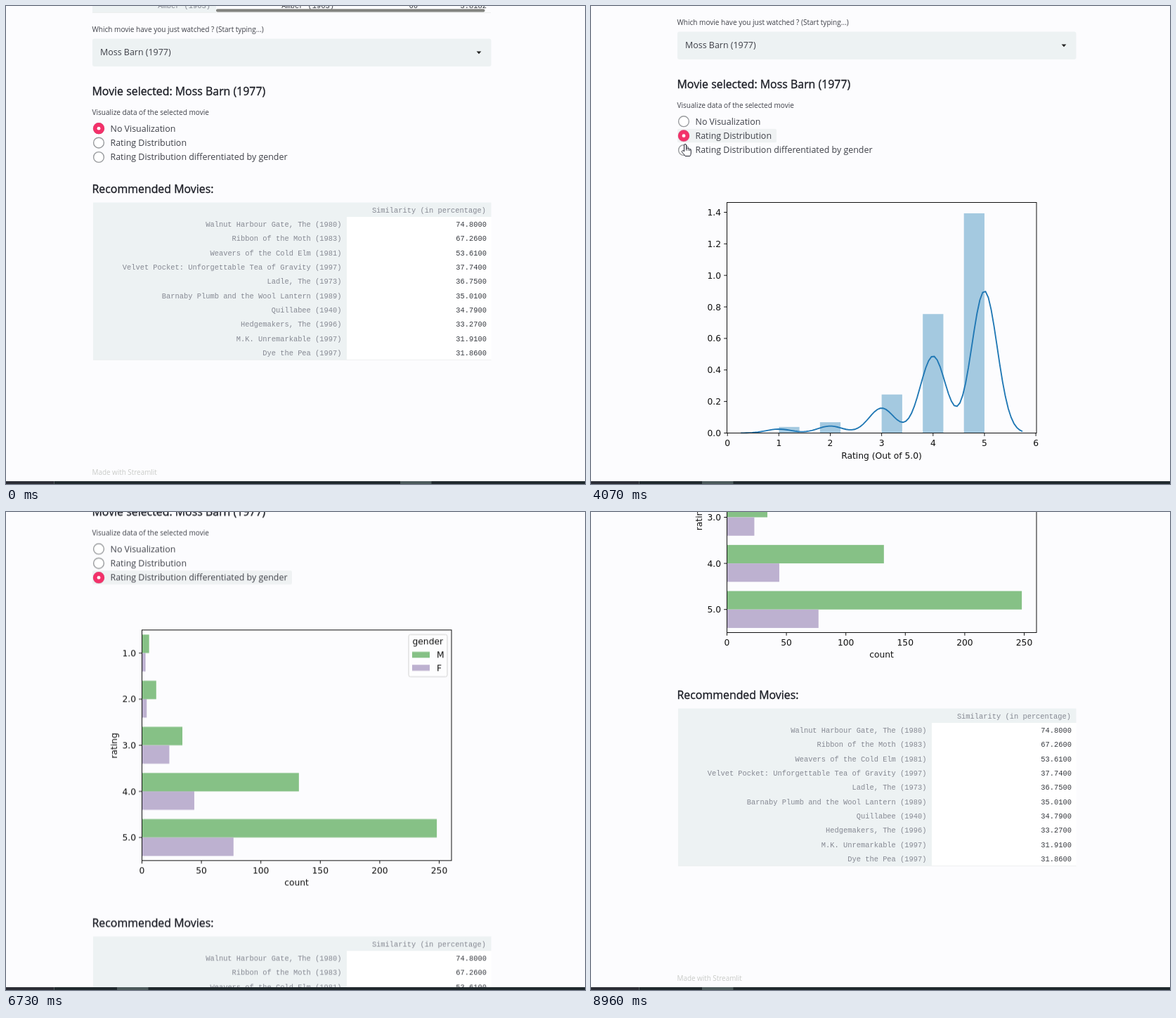
These frames come from a looping animation (824x680 px, 9.01 s). An HTML page:

```html
<!DOCTYPE html>
<html lang="en">
<head>
<meta charset="utf-8">
<title>Movie recommender</title>
<style>
html, body { margin: 0; width: 100%; height: 100%; overflow: hidden; background: #fcfcfe; }
#stage { position: relative; width: 824px; height: 680px; overflow: hidden; }
svg { position: absolute; left: 0; top: 0; overflow: visible; }

text { font-family: "Open Sans", "Noto Sans", sans-serif; font-size: 12.45px; fill: #3f4149; white-space: pre; }
.small { font-size: 10.05px; }
.head { font-size: 15.9px; fill: #1c1e26; stroke: #1c1e26; stroke-width: .35px; }
.foot { font-size: 9.9px; fill: #c9cbc8; }
.mono { font-family: "Liberation Mono", monospace; font-size: 10.4px; text-anchor: end; fill: #373a40; }
.dim { fill: #868993; }
.plot text { font-family: "DejaVu Sans", sans-serif; font-size: 12.3px; fill: #111; }
.end { text-anchor: end; }
.mid { text-anchor: middle; }
.axis { fill: none; stroke: #111; stroke-width: 1; }
.panel { fill: #edf2f3; }

#page, #lower, #plot1, #plot2, #row2, #row3, #dot, #cursor, #arrow, #hand, #task { animation: 9010ms linear infinite; }

#page { animation-name: scroll; }
@keyframes scroll {
  0%, 24.97% { transform: translateY(0); }
  28.08% { transform: translateY(-5px); }
  29.52% { transform: translateY(-5px); animation-timing-function: ease-out; }
  33.74%, 70.92% { transform: translateY(-10px); }
  71.37% { transform: translateY(-11px); animation-timing-function: cubic-bezier(.3, .15, .7, .63); }
  74.69% { transform: translateY(-121px); }
  79.47% { transform: translateY(-315.5px); animation-timing-function: cubic-bezier(.25, .44, .5, 1); }
  85%, 100% { transform: translateY(-446px); }
}
#lower { animation-name: lower; }
@keyframes lower {
  0%, 20% { transform: translateY(0); opacity: 1; }
  24.96% { transform: translateY(0); opacity: .4; animation-timing-function: step-end; }
  24.97%, 100% { transform: translateY(446px); opacity: 1; }
}
#plot1 { animation-name: plot1; }
@keyframes plot1 {
  0% { opacity: 0; animation-timing-function: step-end; }
  24.97%, 54.5% { opacity: 1; }
  60.4% { opacity: .4; animation-timing-function: step-end; }
  60.41%, 100% { opacity: 0; }
}
#plot2 { animation-name: plot2; animation-timing-function: step-end; }
@keyframes plot2 { 0% { opacity: 0; } 60.41%, 100% { opacity: 1; } }

#row2 { animation-name: row2; animation-timing-function: step-end; }
@keyframes row2 { 0% { opacity: 0; } 18.53% { opacity: 1; } 52.83%, 100% { opacity: 0; } }
#row3 { animation-name: row3; animation-timing-function: step-end; }
@keyframes row3 { 0% { opacity: 0; } 52.83%, 100% { opacity: 1; } }
#dot { animation-name: dot; animation-timing-function: step-end; }
@keyframes dot {
  0% { transform: translateY(0); }
  18.53% { transform: translateY(20.4px); }
  52.83%, 100% { transform: translateY(40.8px); }
}
#task { animation-name: task; animation-timing-function: step-end; }
@keyframes task { 0% { transform: translateX(403px); } 5.5%, 100% { transform: translateX(0); } }

#cursor { animation-name: cursor; }
@keyframes cursor {
  0%, 1.44% { transform: translate(590px, 690px); animation-timing-function: ease-out; }
  7.66%, 9.54% { transform: translate(236px, 199px); animation-timing-function: ease-in-out; }
  14.32%, 44.7% { transform: translate(133px, 195px); }
  45.17% { transform: translate(134px, 197px); }
  48.06%, 59.9% { transform: translate(135px, 206px); animation-timing-function: ease-in; }
  62.82% { transform: translate(178px, 231px); }
  67.04%, 100% { transform: translate(830px, 332px); }
}
#arrow { animation-name: arrow; animation-timing-function: step-end; }
@keyframes arrow { 0% { opacity: 1; } 6.5% { opacity: 0; } 61.5% { opacity: 1; } 67.04%, 100% { opacity: 0; } }
#hand { animation-name: hand; animation-timing-function: step-end; }
@keyframes hand { 0% { opacity: 0; } 6.5% { opacity: 1; } 61.5%, 100% { opacity: 0; } }
</style>
</head>
<body>
<div id="stage">
  <svg id="page" width="824" height="1200"></svg>
  <svg width="824" height="680">
    <rect y="676" width="824" height="4" fill="#20292d"/>
    <rect y="676" width="68" height="4" fill="#2b2d35"/>
    <rect x="68" y="676" width="1" height="4" fill="#50565a"/>
    <rect id="task" x="158" y="676" width="44.5" height="4" fill="#4c5a5b"/>
    <g id="cursor" stroke="#1b1d2a" stroke-linejoin="round" fill="#fff">
      <path id="arrow" d="M0 0V15.5L3.6 12.2 6 17.6 8.4 16.5 6 11.3H11Z"/>
      <g id="hand">
        <path d="M-1.5 10V1a1.5 1.5 0 0 1 3 0v5l.3-.5a1.4 1.4 0 0 1 2.4.6 1.4 1.4 0 0 1 2.3.6 1.3 1.3 0 0 1 1.8 1.2v4.1q0 2.5-1.5 4.5H0q-2-3-4.6-5.8a1.5 1.5 0 0 1 2-2z"/>
        <path d="M1.5 6V8.5M4.2 6.5V8.7M6.5 7.2V9" fill="none"/>
      </g>
    </g>
  </svg>
</div>
<script>
const title = "Moss Barn (1977)";
const movies = [
  ["Walnut Harbour Gate, The (1980)", "74.8000"],
  ["Ribbon of the Moth (1983)", "67.2600"],
  ["Weavers of the Cold Elm (1981)", "53.6100"],
  ["Velvet Pocket: Unforgettable Tea of Gravity (1997)", "37.7400"],
  ["Ladle, The (1973)", "36.7500"],
  ["Barnaby Plumb and the Wool Lantern (1989)", "35.0100"],
  ["Quillabee (1940)", "34.7900"],
  ["Hedgemakers, The (1996)", "33.2700"],
  ["M.K. Unremarkable (1997)", "31.9100"],
  ["Dye the Pea (1997)", "31.8600"]
];
const men = [6, 12, 34, 132, 248];
const women = [3, 4, 23, 44, 77];
const green = "#86c186", violet = "#bdb1d0";

const text = (x, y, s, cls = "") => `<text x="${x}" y="${y}" class="${cls}">${s}</text>`;
const rect = (x, y, w, h, attrs) => `<rect x="${x}" y="${y}" width="${w}" height="${h}" ${attrs}/>`;
const range = n => [...Array(n).keys()];

// Axes box shared by both plots
const L = 193.5, R = 634, T = 289.5, B = 617.5;
const frame = rect(L, T, R - L, B - T, 'class="axis"');
const xTick = (x, s) => `<path class="axis" d="M${x} ${B}v4.3"/>` + text(x, 636, s, "mid");
const yTick = (y, s) => `<path class="axis" d="M${L} ${y}h-4.3"/>` + text(185, y + 4.5, s, "end");

function distribution() {
  const px = v => 194.2 + 73.15 * v, py = v => B - 224.3 * v;
  const counts = men.map((m, i) => m + women[i]);
  const total = counts.reduce((a, b) => a + b);
  const starts = [1, 1.8, 3, 3.8, 4.6], h = 0.247;
  const density = x => counts.reduce((sum, c, i) =>
    sum + c * Math.exp(-(((x - i - 1) / h) ** 2) / 2), 0) / (total * h * Math.sqrt(2 * Math.PI));
  const bars = counts.map((c, i) => {
    const y = py(c / total / 0.4);
    return rect(px(starts[i]), y, 29.26, B - y, 'fill="#a4c9e0"');
  });
  const curve = range(100).map(i => {
    const x = 0.26 + 5.48 * i / 99;
    return px(x).toFixed(2) + "," + py(density(x)).toFixed(2);
  });
  return bars.join("") +
    `<polyline points="${curve.join(" ")}" fill="none" stroke="#1f77b4" stroke-width="1.85"/>` + frame +
    range(7).map(i => xTick(px(i), i)).join("") +
    range(8).map(i => yTick(py(i / 5), (i / 5).toFixed(1))).join("") +
    text(413.5, 653.5, "Rating (Out of 5.0)", "mid");
}

function byGender() {
  const step = (B - T) / 5, bar = step * 0.4, unit = 1.692;
  const rows = range(5).map(i => {
    const y = T + step * (i + 0.5);
    return rect(L, y - bar, men[i] * unit, bar, `fill="${green}"`) +
      rect(L, y, women[i] * unit, bar, `fill="${violet}"`) + yTick(y, (i + 1).toFixed(1));
  });
  const key = (y, color, s) => rect(578, y, 25, 8.5, `fill="${color}"`) + text(613, y + 8.7, s);
  return rows.join("") + frame +
    range(6).map(i => xTick(L + i * 50 * unit, i * 50)).join("") +
    text(413.5, 653, "count", "mid") +
    `<g transform="translate(158 454) rotate(-90)">${text(0, 0, "rating", "mid")}</g>` +
    rect(573, 296, 55, 60, 'rx="2.5" fill="#fdfdfe" stroke="#d2d2d2"') +
    text(600.3, 310, "gender", "mid") + key(320.5, green, "M") + key(339, violet, "F");
}

function tableTail() {
  return rect(123, -20, 176, 29.5, 'class="panel"') +
    text(291, 2.5, "Amber (1963)", "mono dim") + text(467, 2.5, "Amber (1963)", "mono") +
    text(586, 2.5, "66", "mono") + text(684, 2.5, "3.8182", "mono") +
    rect(123, 9, 567, 1, 'fill="#eceeee"') + rect(299, 4.3, 382.5, 4.2, 'rx="2" fill="#82837f"');
}

function controls() {
  const options = ["No Visualization", "Rating Distribution", "Rating Distribution differentiated by gender"];
  return text(122.5, 36.8, "Which movie have you just watched ? (Start typing...)", "small") +
    rect(123, 46.5, 567.5, 39.5, 'rx="3" class="panel"') + text(134, 70.3, title) +
    '<path d="M669.6 64.6h6.8l-3.4 3.6z" fill="#222"/>' +
    text(122.5, 127, "Movie selected: " + title, "head") +
    text(122.5, 154.8, "Visualize data of the selected movie", "small") +
    rect(123, 184.7, 141, 19.6, 'id="row2" rx="2" fill="#eff2f3"') +
    rect(123, 205.1, 284, 19.6, 'id="row3" rx="2" fill="#eff2f3"') +
    options.map((s, i) => {
      const y = 174.2 + 20.4 * i;
      return `<circle cx="132" cy="${y}" r="7.4" fill="#fff" stroke="#999b9e" stroke-width="1.4"/>` + text(148.5, y + 4.4, s);
    }).join("") +
    '<g id="dot"><circle cx="132" cy="174.2" r="8.1" fill="#f3316a"/><circle cx="132" cy="174.2" r="2.4" fill="#fff"/></g>';
}

function recommended() {
  const pitch = 20.33;
  return text(122.5, 266, "Recommended Movies:", "head") +
    rect(124, 279.5, 361, 224, 'class="panel"') + rect(485, 279.5, 205.5, 20.5, 'class="panel"') +
    rect(485, 300, 205.5, 203, 'fill="#fff"') + rect(124, 503, 566.5, 1, 'fill="#eef0f1"') +
    text(683, 293.6, "Similarity (in percentage)", "mono dim") +
    movies.map(([name, score], i) => {
      const y = 314 + pitch * i;
      return text(477.5, y, name, "mono dim") + text(684, y, score, "mono");
    }).join("") +
    text(122.5, 666.6, "Made with Streamlit", "foot");
}

document.getElementById("page").innerHTML = tableTail() + controls() +
  `<g id="plot1" class="plot">${distribution()}</g>` +
  `<g id="plot2" class="plot">${byGender()}</g>` +
  `<g id="lower">${recommended()}</g>`;
</script>
</body>
</html>
```
